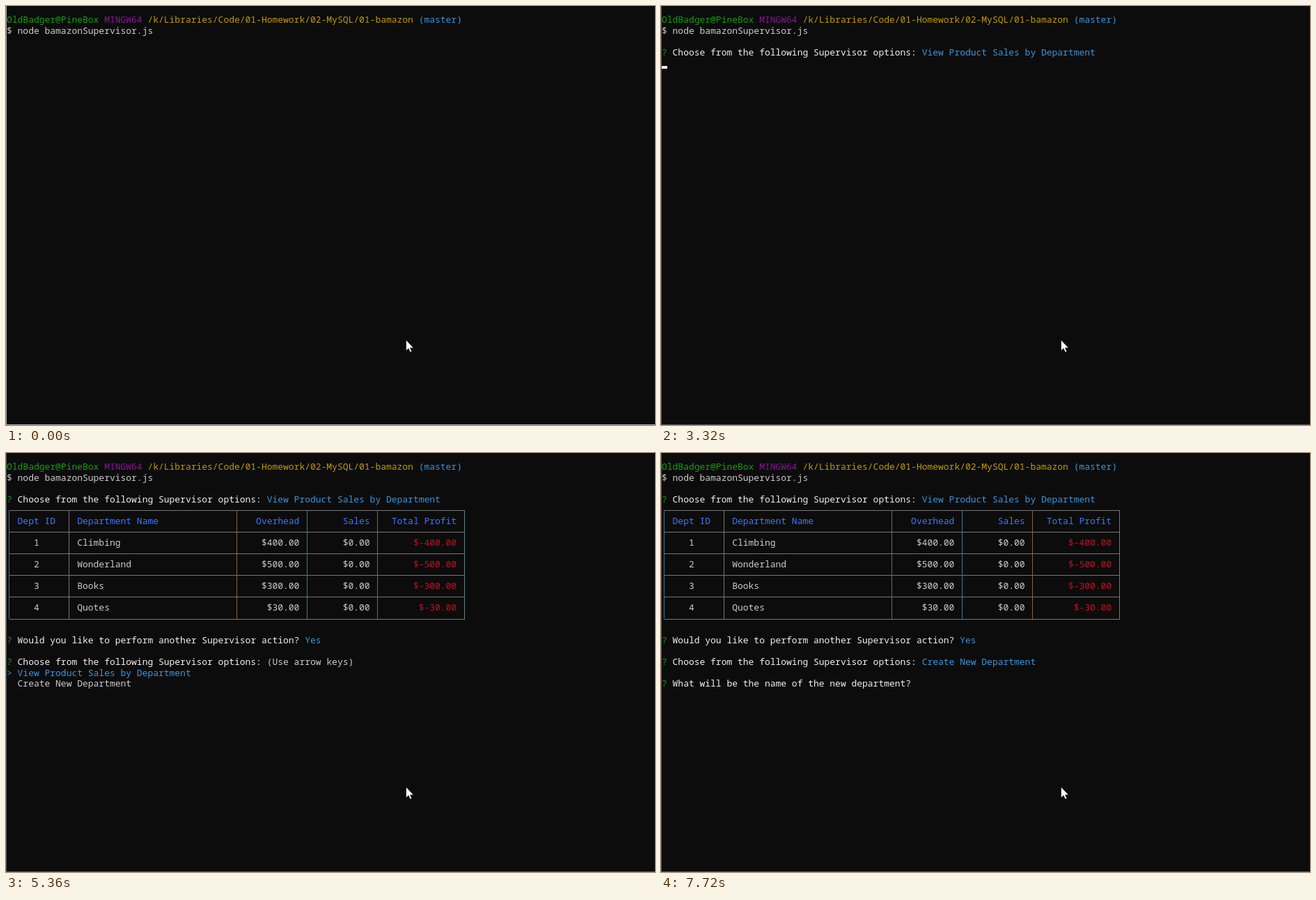
An HTML page with a canvas for the animation above (8000 ms loop, 932 px wide and 601 px high).

```html
<!DOCTYPE html>
<html lang="en">
<head>
<meta charset="utf-8">
<title>Supervisor terminal</title>
<style>
  html, body { margin: 0; width: 100%; height: 100%; overflow: hidden; background: #0c0c0c; }
  canvas { display: block; }
</style>
</head>
<body>
<canvas id="stage" width="932" height="601"></canvas>
<script>
const ctx = document.getElementById('stage').getContext('2d');
const LOOP = 8000;
const CELL_W = 7.785, CELL_H = 15.56, LEFT = 1, BASE = 24;
const GREEN = '#13a10e', PURPLE = '#881798', YELLOW = '#c19c00', CYAN = '#3a96dd',
      BLUE = '#3b78ff', RED = '#c50f1f', GREY = '#cccccc', WHITE = '#f2f2f2';

const OPTIONS = ['View Product Sales by Department', 'Create New Department'];
const DEPARTMENTS = [['Climbing', 400], ['Wonderland', 500], ['Books', 300], ['Quotes', 30]];

// [start time, column, row]; without a position the cursor is hidden
const CURSOR = [
  [0], [370, 28, 1], [830], [890, 0, 2], [1390, 24, 5], [1450],
  [3320, 0, 4], [3380, 61, 16], [3500], [4000, 61, 16], [4560],
  [4870, 62, 16], [5050], [7290, 47, 20], [7720]
];

const colX = col => LEFT + col * CELL_W;
const rowY = row => BASE + row * CELL_H;

function rect(x, y, w, h, color) {
  ctx.fillStyle = color;
  ctx.fillRect(x, y, w, h);
}

// Every character sits in its own terminal cell
function print(col, row, text, color = GREY) {
  ctx.fillStyle = color;
  [...text].forEach((ch, i) => ctx.fillText(ch, colX(col + i), rowY(row)));
  return col + text.length;
}

const printRight = (end, row, text, color) => print(end - text.length, row, text, color);

function ask(row, question, answer = '', color = CYAN) {
  print(0, row, '?', GREEN);
  print(print(2, row, question, WHITE) + 1, row, answer, color);
}

const choose = (row, answer, color) =>
  ask(row, 'Choose from the following Supervisor options:', answer, color);

function menu(row, selected, hint) {
  choose(row, hint ? '(Use arrow keys)' : '', GREY);
  OPTIONS.forEach((option, i) => {
    const active = i === selected;
    if (active) print(0, row + 1 + i, '>', CYAN);
    print(2, row + 1 + i, option, active ? CYAN : GREY);
  });
}

function table() {
  const verticals = [[0, '#46729a'], [11, '#767676'], [42, '#8a6242'],
                     [55, '#46729a'], [68, '#8a6242'], [84, '#687f8c']];
  for (let i = 0; i < 6; i++) rect(5, Math.round(82 + i * 31.1), 654, 1, '#767676');
  for (const [col, color] of verticals) rect(Math.floor(4.6 + col * CELL_W), 82, 1, 156, color);

  print(2, 5, 'Dept ID', BLUE);
  print(13, 5, 'Department Name', BLUE);
  printRight(54, 5, 'Overhead', BLUE);
  printRight(67, 5, 'Sales', BLUE);
  printRight(83, 5, 'Total Profit', BLUE);
  DEPARTMENTS.forEach(([name, cost], i) => {
    const row = 7 + 2 * i;
    print(5, row, String(i + 1));
    print(13, row, name);
    printRight(54, row, `$${cost}.00`);
    printRight(67, row, '$0.00');
    printRight(83, row, `$-${cost}.00`, RED);
  });
}

function pointer() {
  const points = [[0, 0], [0, 15.5], [3.6, 12.3], [6, 17.6], [8.3, 16.6], [6, 11.4], [10.8, 11.4]];
  ctx.beginPath();
  for (const [x, y] of points) ctx.lineTo(574.5 + x, 479 + y);
  ctx.closePath();
  ctx.fillStyle = '#fff';
  ctx.fill();
  ctx.strokeStyle = '#000';
  ctx.lineWidth = 0.6;
  ctx.stroke();
}

function draw(t) {
  rect(0, 0, 932, 601, '#0c0c0c');
  const edge = t < 370 ? '#a8a8a8' : '#555555';
  rect(0, 0, 1, 601, edge);
  rect(0, 600, 932, 1, edge);
  ctx.font = '12.98px "Noto Sans Mono", "DejaVu Sans Mono", monospace';

  print(0, 0, 'OldBadger@PineBox', GREEN);
  print(18, 0, 'MINGW64', PURPLE);
  print(26, 0, '/k/Libraries/Code/01-Homework/02-MySQL/01-bamazon', YELLOW);
  print(76, 0, '(master)', CYAN);
  print(0, 1, '$ node bamazonSupervisor.js');

  if (t >= 3320) choose(3, OPTIONS[0]);
  else if (t >= 1390) menu(3, 0, true);

  if (t >= 3380) {
    table();
    const done = t >= 5360;
    const reply = done ? 'Yes' : t >= 4870 ? '(Y/n) y' : '(Y/n)';
    ask(16, 'Would you like to perform another Supervisor action?', reply, done ? CYAN : GREY);
  }

  if (t >= 7290) {
    choose(18, OPTIONS[1]);
    ask(20, 'What will be the name of the new department?');
  } else if (t >= 6170) menu(18, 1, false);
  else if (t >= 5360) menu(18, 0, true);

  const [, col, row] = CURSOR.filter(step => step[0] <= t).pop();
  if (row !== undefined) rect(Math.round(colX(col)), Math.round(rowY(row) - 0.7), 8, 4, WHITE);
  pointer();
}

const start = performance.now();
function frame() {
  draw((performance.now() - start) % LOOP);
  requestAnimationFrame(frame);
}
frame();
</script>
</body>
</html>
```
